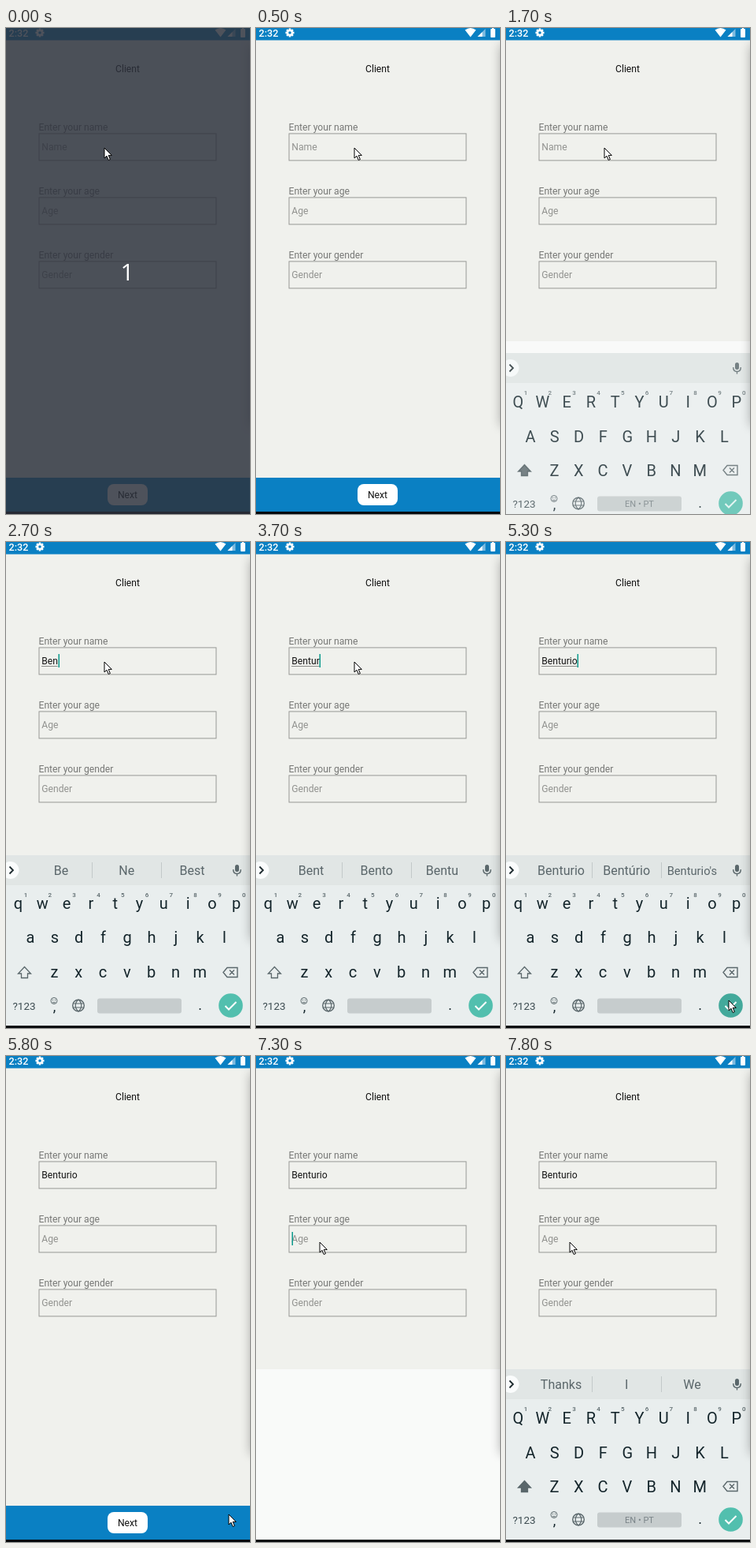
Write an HTML page with a canvas that moves like this. It is 310 px wide and 616 px high and loops after 8 s.

```html
<!DOCTYPE html>
<html lang="en">
<head>
<meta charset="utf-8">
<title>Client form</title>
<style>
html, body { margin: 0; width: 100%; height: 100%; overflow: hidden; background: #f0f1ed; }
canvas { display: block; }
</style>
</head>
<body>
<canvas id="stage" width="310" height="616"></canvas>
<script>
const ctx = document.getElementById('stage').getContext('2d');
const LOOP = 8000, STEP = 100;
const BLUE = '#0a80c3', PAPER = '#f0f1ed', INK = '#14252b', GREY = '#5a676b';

// Each timeline is a list of [start, value]; the last one reached applies.
const TYPED = [[0, ''], [2400, 'B'], [2700, 'Ben'], [2900, 'Bentu'], [3700, 'Bentur'], [3800, 'Benturi'], [4000, 'Benturio']];
const HINTS = [
  [0, null], [2200, ['Thanks', 'I', 'We']], [2500, ['By', 'But', 'Best']], [2700, ['Be', 'Ne', 'Best']],
  [3000, ['Bent', 'Bento', 'Bentu']], [3800, ['Bentu', 'Bentur', 'Benturi']],
  [4000, ['Bentur', 'Bentur', 'Benturi']], [4500, ['Benturio', 'Bentúrio', "Benturio's"]],
  [5800, null], [7600, ['Thanks', 'I', 'We']]
];
const CARET = [[0, 0], [700, 1], [1300, 0], [1800, 1], [2200, 0], [2400, 1], [3400, 0],
  [3700, 1], [4500, 0], [5000, 1], [5500, 0], [7300, 2], [7800, 0]];
const KEYBOARD = [[0, null], [1700, 15], [1800, 4], [1900, 0], [5800, null], [7400, 15], [7500, 4], [7600, 0]];
const POINTER = [[0, 125, 152], [4500, 125, 152], [4800, 252, 540], [4900, 252, 540], [5100, 283, 581],
  [5800, 283, 581], [6000, 61, 205], [6200, 61, 205], [6500, 81, 236], [LOOP, 81, 236]];

const at = (line, t) => line.filter(k => k[0] <= t).pop()[1];
const within = (t, a, b) => t >= a && t < b;

function pointerAt(t) {
  const i = POINTER.findIndex(k => k[0] > t);
  const [t0, x0, y0] = POINTER[i - 1], [t1, x1, y1] = POINTER[i];
  const p = (t - t0) / (t1 - t0);
  return [Math.round(x0 + (x1 - x0) * p), Math.round(y0 + (y1 - y0) * p)];
}

function rect(x, y, w, h, color) {
  ctx.fillStyle = color;
  ctx.fillRect(x, y, w, h);
}
function round(x, y, w, h, r, color) {
  ctx.fillStyle = color;
  ctx.beginPath();
  ctx.roundRect(x, y, w, h, r);
  ctx.fill();
}
function disc(x, y, r, color) {
  ctx.fillStyle = color;
  ctx.beginPath();
  ctx.arc(x, y, r, 0, 7);
  ctx.fill();
}
function ring(x, y, r, color, width = 1) {
  ctx.strokeStyle = color;
  ctx.lineWidth = width;
  ctx.beginPath();
  ctx.arc(x, y, r, 0, 7);
  ctx.stroke();
}
function text(str, x, y, size, color, align = 'left', weight = 400) {
  ctx.font = `${weight} ${size}px Roboto, sans-serif`;
  ctx.textAlign = align;
  ctx.fillStyle = color;
  ctx.fillText(str, x, y);
}
function shape(d, x, y, fill, stroke, width = 1) {
  const path = new Path2D(d);
  ctx.save();
  ctx.translate(x, y);
  if (fill) { ctx.fillStyle = fill; ctx.fill(path); }
  if (stroke) { ctx.strokeStyle = stroke; ctx.lineWidth = width; ctx.stroke(path); }
  ctx.restore();
}

function statusBar() {
  rect(0, 0, 310, 15.5, BLUE);
  text('2:32', 3.5, 10.7, 12.6, '#fff', 'left', 500);
  for (let i = 0; i < 4; i++) {
    ctx.save();
    ctx.translate(43, 6);
    ctx.rotate(i * Math.PI / 4);
    rect(-1.3, -5.5, 2.6, 11, '#fff');
    ctx.restore();
  }
  ring(43, 6, 3, '#fff', 2.2);
  disc(43, 6, 1.8, BLUE);
  shape('M0 2Q7 -3 14 2L7 11Z', 265.5, .5, '#fff');
  shape('M10 0V10H0Z', 281.5, 1, '#7fbbe0');
  shape('M6 4V10H0Z', 281.5, 1, '#fff');
  round(298, 1, 6, 11, 1, '#fff');
  rect(300, 0, 2, 1, '#fff');
}

function field(y, label, hint, value, composing, caret) {
  text(label, 41.5, y - 3, 12.15, '#777876');
  ctx.strokeStyle = '#979895';
  ctx.lineWidth = 1;
  ctx.strokeRect(42, y + .9, 225, 34);
  text(value || hint, 45.3, y + 22.4, 12.15, value ? '#151515' : '#929390');
  const width = value ? ctx.measureText(value).width : 0;
  if (value && composing) rect(45, y + 24, width, 1, '#8a8a88');
  if (caret) rect(45.5 + Math.round(width), y + 9, 1.5, 17, '#0a9a8c');
}

function footer() {
  rect(0, 570, 310, 43, BLUE);
  round(129, 578, 51, 27, 8, '#fff');
  text('Next', 154.5, 596, 12.15, '#111', 'center');
}

function hintBar(hints) {
  rect(0, 397, 310, 38, '#e1e6e5');
  disc(5.5, 416, 11, '#fafcfc');
  shape('M0 0L4.5 4.5L0 9', 4.5, 411.5, null, '#1d2a2e', 1.8);
  round(291, 409, 5, 9, 2.5, GREY);
  shape('M0 0Q0 5.5 4.8 5.5Q9.6 5.5 9.6 0M4.8 5.5V8.5', 288.7, 415, null, GREY, 1.4);
  if (!hints) return;
  rect(109, 406, 1, 20, '#c3c9c9');
  rect(197, 406, 1, 20, '#c3c9c9');
  hints.forEach((word, i) => text(word, 70 + i * 83.2, 422, word.length > 9 ? 14.7 : 16, '#5a666a', 'center'));
}

function keys(upper) {
  const rows = [['qwertyuiop', 15.5, 466], ['asdfghjkl', 31, 509.5], ['zxcvbnm', 61.5, 553]];
  const lift = upper ? 0 : 1.5;
  for (const [letters, x, y] of rows) {
    [...(upper ? letters.toUpperCase() : letters)].forEach((c, i) => text(c, x + i * 30.8, y - lift, 20, INK, 'center'));
  }
  for (let i = 0; i < 10; i++) text((i + 1) % 10, 25 + i * 30.8, 450, 8, GREY, 'center', 500);
  shape('M8 0L16 8.5H12V14H4V8.5H0Z', 15.5, 538.5, upper ? GREY : null, GREY, 1.3);
  shape('M5 0H18V12H5L0 6ZM8 3L14 9M14 3L8 9', 276, 539.5, null, GREY, 1.4);
}

function bottomRow(label, pressed) {
  text('?123', 23, 592.5, 13.5, '#3c4b50', 'center');
  ring(61, 581.5, 4, GREY);
  disc(59.5, 580.5, .7, GREY);
  disc(62.5, 580.5, .7, GREY);
  shape('M0 0Q2 2 4 0', 59, 583, null, GREY);
  text(',', 61.5, 595, 18, INK, 'center');
  ring(92, 587.5, 7.3, GREY, 1.4);
  shape('M0 5H14M0 10H14M7 0C2 4 2 11 7 15C12 11 12 4 7 0', 85, 580, null, GREY, 1.2);
  round(116, 578.5, 107, 19, 3, '#c6cccd');
  if (label) text('EN • PT', 169.5, 592, 11, '#7b8589', 'center');
  text('.', 246.5, 593, 18, INK, 'center');
  disc(285.5, 587.5, 15.3, pressed ? '#43a99b' : '#52bfae');
  shape('M0 5L4.5 9.5L14 0', 278.5, 583, null, '#fff', 2);
}

function keyboard(t, drop) {
  ctx.save();
  ctx.translate(0, drop);
  ctx.globalAlpha = 1 - drop * .013;
  rect(0, 397, 310, 220, '#e9eeee');
  hintBar(at(HINTS, t));
  keys(!within(t, 2400, 7000));
  bottomRow(!within(t, 2200, 7000), within(t, 5200, 5500));
  ctx.restore();
}

function edgeShadow() {
  ctx.save();
  ctx.beginPath();
  ctx.rect(0, 16, 310, 600);
  ctx.clip();
  ctx.shadowColor = 'rgba(0,0,0,.32)';
  ctx.shadowBlur = 14;
  rect(311, 22, 40, 482, '#000');
  ctx.restore();
}

function countdown() {
  rect(0, 0, 310, 616, 'rgba(45,50,60,.84)');
  ctx.font = '30px "Open Sans", sans-serif';
  ctx.textAlign = 'center';
  ctx.fillStyle = '#fff';
  ctx.fillText('1', 154, 320);
}

function draw(t) {
  rect(0, 0, 310, 616, PAPER);
  statusBar();
  text('Client', 154.5, 55.5, 12.15, '#111', 'center');
  const caret = at(CARET, t);
  field(133, 'Enter your name', 'Name', at(TYPED, t), t < 5800, caret === 1);
  field(214, 'Enter your age', 'Age', '', false, caret === 2);
  field(295, 'Enter your gender', 'Gender', '', false, false);

  const drop = at(KEYBOARD, t);
  const resized = within(t, 1300, 5800) || t >= 7300;
  if (resized) rect(0, 397, 310, 219, '#f9faf9');
  else footer();
  if (drop !== null) keyboard(t, drop);
  if (!drop) rect(0, 613, 310, 3, '#06090b');
  edgeShadow();

  if (t < 500) countdown();
  const [x, y] = pointerAt(t);
  shape('M0 0V13L3 10.2L5.2 15.5L7.4 14.5L5.2 9.4H9.3Z', x, y, '#fff', '#000');
}

function frame(now) {
  draw(Math.floor(now % LOOP / STEP) * STEP);
  requestAnimationFrame(frame);
}
requestAnimationFrame(frame);
</script>
</body>
</html>
```
